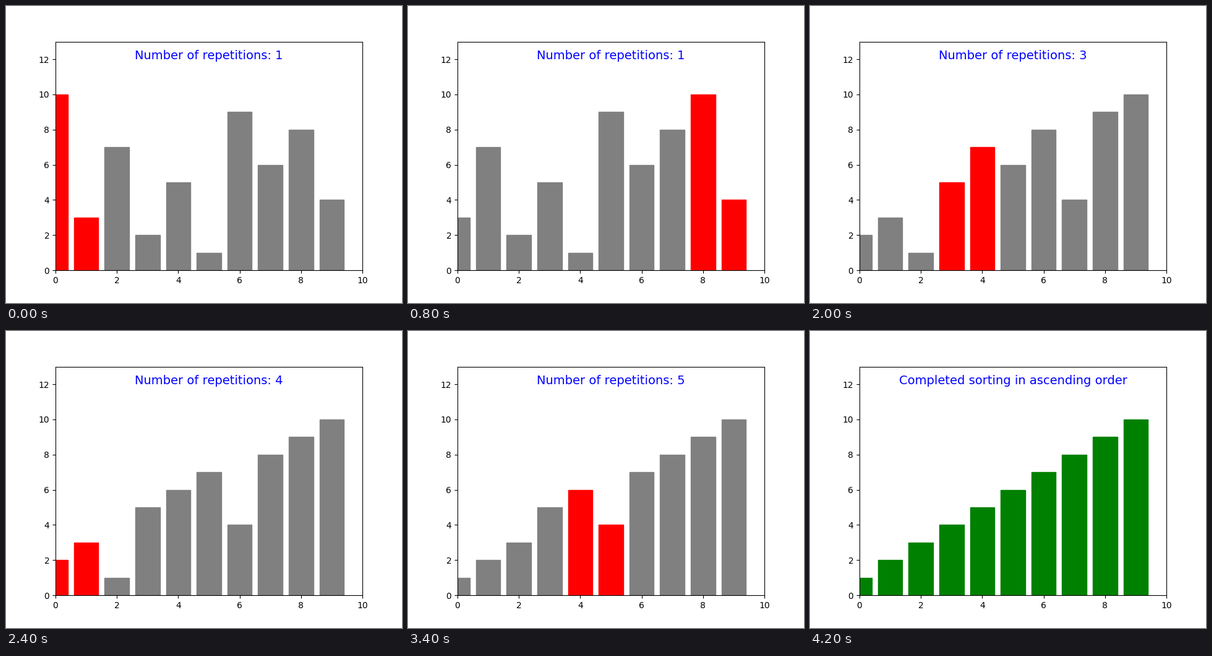
A matplotlib script that plays this animation: 640x480 px, repeating every 4300 ms.

```python
import matplotlib.pyplot as plt
from matplotlib.animation import FuncAnimation

START = [10, 3, 7, 2, 5, 1, 9, 6, 8, 4]
STEP_MS = 100


def bubble_sort_steps(values):
    """Yield (heights, bar colours, caption) before each comparison, then the end."""
    values = list(values)
    count = len(values)
    for rep in range(1, count):
        swapped = False
        for j in range(count - rep):
            colors = ["red" if i in (j, j + 1) else "gray" for i in range(count)]
            yield list(values), colors, f"Number of repetitions: {rep}"
            if values[j] > values[j + 1]:
                values[j], values[j + 1] = values[j + 1], values[j]
                swapped = True
        if not swapped:
            break
    yield list(values), ["green"] * count, "Completed sorting in ascending order"


steps = list(bubble_sort_steps(START))

plt.rcParams["font.family"] = "DejaVu Sans"
fig, ax = plt.subplots(figsize=(6.4, 4.8), dpi=100)
ax.set_xlim(0, 10)
ax.set_ylim(0, 13)
bars = ax.bar(range(len(START)), START, color="gray")
caption = ax.text(5, 12, "", ha="center", color="blue", fontsize=14)


def draw(index):
    heights, colors, text = steps[index]
    for bar, height, color in zip(bars, heights, colors):
        bar.set_height(height)
        bar.set_color(color)
    caption.set_text(text)
    return [*bars, caption]


anim = FuncAnimation(fig, draw, frames=len(steps), interval=STEP_MS,
                     repeat=True, repeat_delay=0)
plt.show()
```
